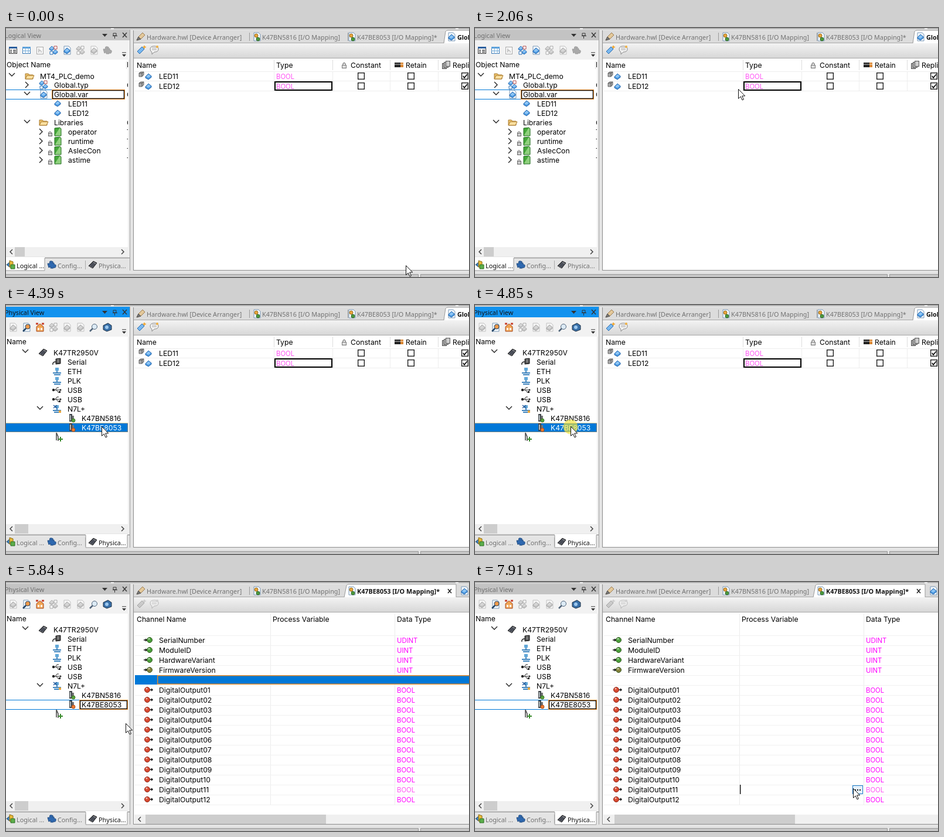
Animation, 790 px wide and 425 px high, one loop 8 s. Source, as an HTML page:

```html
<!DOCTYPE html>
<html lang="en">
<head>
<meta charset="utf-8">
<title>I/O mapping walkthrough</title>
<style>
html, body { margin: 0; width: 100%; height: 100%; overflow: hidden; background: #e4e4e4; }
svg { display: block; }
text { font: 12.2px Inter, "Open Sans", sans-serif; white-space: pre; }
.ui { font: 10.8px "Noto Sans", "Open Sans", sans-serif; fill: #707070; }
.on { fill: #111; }
.b { font-weight: 700; }
.type { font-size: 11.3px; fill: #f0f; }
.soft { fill: #ff50f4; }
.picked text { fill: #fff; }
.off { filter: grayscale(1); opacity: .5; }
</style>
</head>
<body>
<svg id="stage" width="790" height="425"></svg>
<script>
const KIND_IN = 'K47BN5816', KIND_OUT = 'K47BE8053', CPU = 'K47TR2950V', BUS = 'N7L+';
const BLUE = '#0078d7', ORANGE = '#e58a2b';

// Drawing helpers; y of text is the middle of its row.
const text = (x, y, s, cls = '') => `<text x="${x}" y="${y + 5}" class="${cls}">${s}</text>`;
const ui = (x, y, s, cls = '') => text(x, y - .4, s, 'ui ' + cls);
const rect = (x, y, w, h, fill) => `<rect x="${x}" y="${y}" width="${w}" height="${h}" fill="${fill}"/>`;
const box = (x, y, w, h, stroke, fill = 'none', sw = 1, more = '') =>
  `<rect x="${x + sw / 2}" y="${y + sw / 2}" width="${w - sw}" height="${h - sw}" fill="${fill}" stroke="${stroke}" stroke-width="${sw}" ${more}/>`;
const path = (d, stroke, fill = 'none', sw = 1, more = '') =>
  `<path d="${d}" stroke="${stroke}" fill="${fill}" stroke-width="${sw}" ${more}/>`;
const ball = (x, y, r, fill, stroke = 'none') => `<circle cx="${x}" cy="${y}" r="${r}" fill="${fill}" stroke="${stroke}"/>`;
const group = (id, ...parts) => `<g id="${id}">${parts.join('')}</g>`;
const range = (n, f) => Array.from({ length: n }, (_, i) => f(i)).join('');
const DOTS = 'stroke-dasharray="1 1"';

const gem = (x, y, s = 1) => `<g transform="translate(${x} ${y}) scale(${s})" stroke-linejoin="round">` +
  path('M-5 0L0-5 5-1V1L0 5-5 2Z', '#2767ad', '#4a98e0') + path('M-4 0L0-4 4-1 0 2Z', 'none', '#8cc4f4') + '</g>';
const sheet = path('M-5-7H3L6-4V7H-5Z', '#7896b4', '#f4faff');
const plug = path('M0-6V2M-7 3H7M-5 6H6', '#3d83bd', 'none', 2) + rect(-3, -6, 6, 5, '#62a8d8');
const lens = ball(1, -1, 4.5, '#dceaf5', '#51657a') + path('M-2 2L-7 7', '#51657a', 'none', 2.5);
const chip = path('M-7 2L1-6 7-3 0 6Z', '#222', '#4a4e58') + path('M-6 4L-4 2M-3 6L-1 4M1-4L5-2', '#aaa');
const module = rect(-4, -7, 5, 13, '#3f4448') + rect(-3, -5, 2, 9, '#aeb6ba') + rect(1, -4, 3, 10, '#777');
const art = {
  gem: gem(0, 0),
  folder: path('M-7-4H-2L0-2H6V5H-7Z', '#a8782a', '#edc36c') + path('M-7 5L-4-1H8L5 5Z', '#a8782a', '#fbe0a0'),
  types: gem(-3, -3, .8) + gem(3, 3, .8) + path('M1-7H6V-2H1Z', '#b34a4a', '#fff') + path('M-6 2H-1V7H-6Z', '#2b6cb0', '#fff'),
  page: sheet + gem(0, 1),
  list: box(-7, -6, 14, 12, '#333', '#fff') + rect(-7, -6, 14, 3, '#2b5f9e') + path('M-5 0H-2M0 0H5M-5 3H-2M0 3H5', '#333', 'none', 1.5),
  grid: box(-7, -6, 14, 12, '#3d7ab5', '#fff') + rect(-7, -6, 14, 3, '#5aa0dc') + path('M-2-6V6M3-6V6M-7 1H7', '#6fa8d6'),
  letter: box(-6, -6, 12, 13, '#aaa', '#f8f8f8') + path('M-2-3V4M-2 1Q2-2 2 4', '#999'),
  lock: path('M-2 0V-2Q0-5 2-2V0', '#666') + box(-3, -1, 7, 6, '#666', '#ccc'),
  book: path('M-5-6L4-7V6L-5 7Z', '#1e6b1e', '#45a83a') + path('M4-7L6-5V7L-5 7', '#1e6b1e', '#8fd07d'),
  bigLock: path('M-2 0V-3Q0-6 2-3V0', '#777', 'none', 1.3) + box(-4, -1, 8, 6, '#777', '#ddd'),
  battery: rect(-8, -4, 10, 8, '#222') + rect(2, -4, 5, 8, '#d98632') + rect(-8, -2, 15, 2, '#ffffff66'),
  stack: box(-7, -3, 8, 10, '#555', '#aaa') + box(-4, -5, 8, 10, '#555', '#bbb') + box(-1, -7, 8, 10, '#555', '#ccc'),
  tiny: path('M-4-2L-1-4H4V1L1 4H-4Z', '#666', '#aaa') + path('M-4-2H1V4M1-2L4-4', '#555'),
  pencil: path('M-7 6L-4 0 3-7 7-3 0 4Z', '#9a7a50', '#e3c89a') + path('M-7 6L-4 0 0 4Z', '#555', '#777'),
  map: sheet + ball(-1, -2, 3, '#e8a63c', '#9c6a18') + ball(2, 4, 3, '#4d9b3f', '#2c6425'),
  wand: path('M-7 2L1-6 5-2-3 6Z', '#2b6cb0', '#79b8ef') + path('M5-8V-3M2.5-5.5H8', '#f0a020', 'none', 1.6),
  note: path('M-7-2Q-7-7 0-7T7-2Q7 3 0 3L-4 7V3Q-7 2-7-2Z', '#888', '#f4f4f4') + path('M-4-4H4M-4-1H4', '#999') + ball(5, -6, 2, '#f0b040'),
  find: sheet + ball(2, -1, 4, '#ef9a4a', '#246') + path('M-1 2L-6 7', '#246', 'none', 2.5),
  house: path('M-6-1L0-6 6-1V7H-6Z', '#a64b25', '#f0a352') + path('M-7-6H-3M3-6H7', '#c8402c', 'none', 3) + rect(-4, 1, 3, 4, '#fff') + rect(1, 1, 3, 4, '#fff'),
  lens, chip, plug,
  pc: path('M-7-3L1-7 7-3V4L-1 7-7 4Z', '#234', '#386fa8') + ball(-1, 0, 3, '#9cc8ee'),
  serial: path('M-7 5Q-8 0-2 0', '#222', 'none', 1.5) + path('M-2-5L6-6V3L-2 4Z', '#222', '#444') + path('M0-3H4M0 0H4', '#ddd'),
  usb: path('M-7 0H6M-3 0L0-4H3M-1 0L2 4H4', '#222') + ball(-6, 0, 2.2, '#222') + rect(3, 2, 3, 3, '#222') + path('M5-2L8 0 5 2Z', 'none', '#222'),
  bus: plug + path('M-6-6L0-1M0-6L-6-1', '#245a9c', 'none', 1.6) + rect(3, 3, 4, 4, '#e8a63c'),
  modIn: module + ball(3, 4, 3, '#58a23d', '#3a7525'),
  modOut: module + ball(3, 4, 3, '#ee7a2e', '#ad4818'),
  add: path('M-3-7L0 0V7M-3-7V6', '#555', 'none', 1.7) + path('M4 0V8M0 4H8', '#3c8d2f', 'none', 2),
  cubes: path('M-7 0L-2-4 2-1-2 4Z', '#245', '#3f86cc') + path('M-2-7L4-5V5L-2 4Z', '#8c6a10', '#e8b93a') + path('M0 0H7V7H0Z', '#2c6e25', '#5cae4b'),
  puzzle: path('M-7-2H-3Q-5-7 0-6T0-3H4V0Q8-1 7 3T3 4V6H-2V3L-5 5Z', '#1f4a80', '#2f69b0'),
};
const icon = (name, x, y, cls = '') => `<g transform="translate(${x} ${y})" class="${cls}">${art[name]}</g>`;
const open = (x, y) => path(`M${x - 5} ${y - 3}l5 5 5-5`, '#222', 'none', 1.4);
const shut = (x, y) => path(`M${x - 2} ${y - 5}l5 5-5 5`, '#222', 'none', 1.4);
const check = (x, y, on) => box(x - 6, y - 6, 12, 12, '#111', '#fff', 1.3) + (on ? path(`M${x - 3} ${y}l2 3 5-6`, '#111', 'none', 1.8) : '');
const tools = names => names.split(' ').map((n, i) => icon(n.replace('-', ''), 12 + i * 23, 38, n[0] == '-' ? 'off' : '')).join('');
const scroll = (x, y, w, from, len) => rect(x, y, w, 16, '#f0f0f0') + rect(from, y, len, 16, '#cdcdcd') +
  path(`M${x + 11} ${y + 4}l-4 4 4 4`, '#444', 'none', 1.5);
const treeScroll = len => scroll(0, 374, 208, 15, len) + path('M197 378l4 4-4 4', '#444', 'none', 1.5);
const focusRow = (y, x, end) => path(`M0 ${y - 7.5}H${x}M0 ${y + 8.5}H${x}`, BLUE) +
  box(x - 1, y - 8, end - x + 2, 17, ORANGE) + box(x, y - 7, end - x, 15, '#111', '#fff', 1.3);

const titleBar = (id, fill) => group(id, rect(0, 3, 211, 18, fill),
  path('M164 10h9l-4.5 5z', 'none', '#333'), path('M183 9h5v4h-5zM182 13.5h8M185.5 14v4', '#333'), path('M199 8l7 8M206 8l-7 8', '#333', 'none', 1.4));

const frame = '<linearGradient id="bar" x2="0" y2="1"><stop stop-color="#f4f4f4"/><stop offset="1" stop-color="#d6d6d6"/></linearGradient>' +
  rect(0, 0, 790, 425, '#e4e4e4') + rect(0, 0, 179, 2, '#b4b4b4') + rect(184, 0, 583, 2, '#b4b4b4') + rect(772, 0, 18, 2, '#b4b4b4') +
  rect(0, 21, 211, 33, '#f2f2f2') + rect(0, 54, 208, 320, '#fff') + rect(211, 3, 1, 411, '#a0a0a0') + rect(208, 54, 3, 337, '#eee') +
  rect(0, 392, 211, 1, '#888') + path('M135.5 397V412', '#aaa') +
  path('M198 42h7', '#333') + path('M198 45h7l-3.5 4z', 'none', '#333') +
  rect(0, 420, 703, 5, '#c6c6c6') + rect(707, 420, 83, 5, '#c6c6c6') + path('M0 420.5H703.5V425M707.5 425V420.5H790', '#999') +
  rect(217, 4, 573, 22, '#dcdcdc') + rect(217, 25, 573, 27, 'url(#bar)') + rect(217, 51, 573, 363, '#fff') +
  path('M217.5 4V414M217 413.5H790', '#8d8d8d') + path('M218 25.5H790M218 51.5H790', '#a8a8a8');

const bottomTab = (x, w) => path(`M${x} 392H${x + w}V414H${x}Z`, '#999', '#fff') + rect(x, 391, w, 2, '#fff');
const bottomTabs = active => ['Logical ...', 'Config...', 'Physica...'].map((s, i) =>
  icon(['cubes', 'puzzle', 'chip'][i], 8 + i * 70, 404) + ui(18 + i * 70, 405, s, i == active ? 'on' : '')).join('');

const logical = group('logical',
  tools('list grid letter types page -types -page -puzzle'),
  text(1, 62, 'Object Name'), path('M205.5 57V70', '#ddd'),
  open(10, 80), icon('folder', 40, 82), text(58, 82, 'MT4_PLC_demo'),
  shut(35, 97), icon('types', 64, 97), text(82, 97, 'Global.typ'),
  focusRow(113, 79, 202), open(36, 112), icon('page', 64, 113), text(82, 113, 'Global.var'),
  icon('gem', 88, 129), text(106, 129, 'LED11'), icon('gem', 88, 145), text(106, 145, 'LED12'),
  open(36, 160), icon('folder', 64, 161), text(82, 161, 'Libraries'),
  ...['operator', 'runtime', 'AsIecCon', 'astime'].map((s, i) => {
    const y = 177 + i * 16;
    return shut(59, y) + icon('lock', 75, y + 3) + icon('book', 88, y) + text(106, y, s);
  }),
  // Next column, cut off by the pane edge.
  '<svg width="208" height="374">', text(206, 62, 'D'), ...[97, 113, 161].map(y => text(206, y, 'C')),
  range(4, i => text(206, 177 + i * 16, 'T')), '</svg>',
  treeScroll(17), bottomTab(-1, 67), bottomTabs(0));

const devices = [['chip', 63, CPU], ['serial', 87, 'Serial'], ['plug', 87, 'ETH'], ['plug', 87, 'PLK'], ['usb', 87, 'USB'],
  ['usb', 87, 'USB'], ['bus', 87, BUS], ['modIn', 112, KIND_IN], ['modOut', 112, KIND_OUT], ['add', 89, '']];
const physical = group('physical',
  tools('-page find house -types -page -page lens pc'),
  text(1, 62, 'Name'),
  group('rowLine', box(-1, 201, 209, 16, BLUE)),
  group('rowFill', rect(0, 202, 208, 15, BLUE), box(-1, 201, 209, 16, ORANGE, 'none', 1, DOTS)),
  group('rowEdit', focusRow(209, 126, 207)),
  open(33, 79), open(58, 176),
  ...devices.map(([n, x, s], i) => {
    const label = text(x + 18 - (n.startsWith('mod') ? 1 : 0), 81 + i * 16, s);
    return icon(n, x, 81 + i * 16) + (i == 8 ? group('rowText', label) : label);
  }),
  treeScroll(23), bottomTab(136, 71), bottomTabs(2));

const tabOut = KIND_OUT + ' [I/O Mapping]*';
const docs = icon('pencil', 230, 15) + ui(240, 15, 'Hardware.hwl [Device Arranger]') + path('M415.5 8V22', '#999') +
  icon('map', 428, 15) + ui(437, 15, KIND_IN + ' [I/O Mapping]');

const variables = group('variables',
  path('M583.5 8V22', '#999'), icon('map', 590, 15), ui(599, 15, tabOut),
  path('M747 26L750 6Q751 4 754 4H791V26', '#999', '#fff'), icon('page', 760, 15), ui(770, 15, 'Global.var', 'on b'),
  icon('wand', 231, 38), icon('note', 253, 38),
  text(223, 63, 'Name'), text(461, 63, 'Type'), icon('bigLock', 577, 64), text(588, 63, 'Constant'),
  icon('battery', 671, 63), text(682, 63, 'Retain'), icon('stack', 751, 63), text(762, 63, 'Replicable'),
  path('M457.5 54V72M557.5 54V72M655.5 54V72M737.5 54V72', '#ddd'),
  path('M220 74.5H790M220 90.5H790M220 107.5H790M457.5 74V107M557.5 74V107M655.5 74V107M737.5 74V107', '#eee'),
  ...['LED11', 'LED12'].map((s, i) => {
    const y = 82 + i * 17;
    return icon('tiny', 231, y - 3) + icon('gem', 243, y + 1) + text(261, y, s) + text(461, y, 'BOOL', 'type soft') +
      check(606, y, 0) + check(691, y, 0) + check(783, y, 1);
  }),
  group('cellBox', box(458, 91, 99, 16, '#000', 'none', 2)),
  group('dotted', box(458, 92, 99, 14, '#000', 'none', 1), path('M219 91.5H790M219 106.5H790', '#333', 'none', 1, DOTS)));

const channels = ['SerialNumber', 'ModuleID', 'HardwareVariant', 'FirmwareVersion', '',
  ...Array.from({ length: 12 }, (_, i) => 'DigitalOutput' + String(i + 1).padStart(2, '0'))];
const port = (y, i) => i < 4
  ? path(`M235 ${y}h5M238 ${y - 2}l2 2-2 2`, '#111', 'none', 1.4) + ball(245, y, 4.5, i == 3 ? '#85823c' : '#4ba03c', '#31551f') + ball(244, y - 2, 1.5, '#ffffff99')
  : path(`M244 ${y}h6M248 ${y - 2}l2 2-2 2`, '#111', 'none', 1.4) + ball(241, y, 4.5, '#d84a30', '#8d2418') + ball(240, y - 2, 1.5, '#ffffff99');
const selected = (y, x, w) => rect(220, y - 8, 570, 16, BLUE) + box(x, y - 8, w, 16, ORANGE, 'none', 1.5);
const mapping = group('mapping',
  path('M577 26L581 6Q582 4 584 4H768V26', '#999', '#fff'), icon('map', 590, 15), ui(599, 15, tabOut, 'on b'),
  path('M754 12l6 7M760 12l-6 7', '#222', 'none', 1.5), icon('page', 782, 15),
  icon('wand', 231, 38, 'off'), icon('note', 253, 38, 'off'),
  text(223, 63, 'Channel Name'), text(455, 63, 'Process Variable'), text(667, 63, 'Data Type'),
  path('M451.5 54V380M663.5 54V380', '#ebebeb'),
  range(18, i => path(`M220 ${91.5 + i * 17}H790`, '#f1f1f1')),
  group('pickBlank', selected(167, 258, 534)),
  group('pickLast', selected(354, 452, 211)),
  channels.map((s, i) => {
    const y = 99 + i * 17;
    if (!s) return '';
    const kind = i == 0 ? 'UDINT' : i < 4 ? 'UINT' : 'BOOL';
    const row = text(261, y, s) + text(667, y, kind, 'type' + (i == 15 ? ' soft' : ''));
    return port(y, i) + (i == 15 ? group('lastText', row) : row);
  }).join(''),
  group('more', box(644, 347, 18, 15, '#1979c8', '#e5f1fb'), range(3, i => rect(648 + i * 4, 354, 2, 2, '#111'))),
  group('caret', rect(452, 346, 1.3, 16, '#000')),
  scroll(219, 397, 571, 238, 308));

const stage = document.getElementById('stage');
stage.innerHTML = frame + titleBar('titleGrey', '#c3c3c3') + titleBar('titleBlue', '#1292ee') +
  group('nameLogical', ui(-2, 12, 'Logical View')) + group('namePhysical', ui(-2, 12, 'Physical View')) +
  group('nameActive', ui(-2, 12, 'Physical View', 'on')) +
  logical + physical + docs + variables + mapping +
  group('tip', box(174, 420, 72, 18, '#767676', '#fff')) +
  `<circle id="halo" r="12.5" fill="#f4e53c"/>` +
  group('cursor', path('M.5.5V16.5L4.2 13 7 19 9.4 18 6.7 12H11.7Z', '#111', '#fff'));

const el = id => document.getElementById(id);
const show = (id, on) => el(id).style.display = on ? '' : 'none';

// Pointer keys: time, x, y.
const keys = [[0, 682, 405], [20, 682, 405], [270, 535, 300], [560, 320, 208], [830, 178, 316], [910, 202, 299], [1200, 375, 165],
  [1470, 497, 66], [1660, 480, 95], [2060, 449, 104], [2250, 300, 250], [2470, 152, 412], [2700, 152, 412], [2980, 174, 400],
  [3870, 174, 400], [4390, 163, 207], [5460, 163, 207], [5840, 204, 241], [6270, 542, 339], [6490, 567, 356],
  [6870, 567, 356], [7280, 645, 352], [8000, 645, 352]];
const slope = (i, k) => (keys[i + 1][k] - keys[i][k]) / (keys[i + 1][0] - keys[i][0]);
function tangent(i, k) {
  if (i == 0 || i == keys.length - 1) return 0;
  const a = slope(i - 1, k), b = slope(i, k);
  return a * b <= 0 ? 0 : 2 * a * b / (a + b);
}
function pointer(t, k) {
  const i = Math.max(0, keys.findIndex(p => p[0] > t) - 1);
  const [p, q] = [keys[i], keys[i + 1]], d = q[0] - p[0], u = (t - p[0]) / d, v = 1 - u;
  return v * v * (1 + 2 * u) * p[k] + u * u * (3 - 2 * u) * q[k] + d * u * v * (v * tangent(i, k) - u * tangent(i + 1, k));
}

const clicks = [[3390, 3490], [4600, 4700], [4800, 4920], [6720, 6830], [7460, 7570]];

function draw(t) {
  const views = t >= 3450, named = t >= 3680, active = t >= 3720 && t < 5200, mapped = t >= 5200;
  const dotted = views && t < 3720, pickLast = t >= 6800 && t < 7540;
  show('logical', !views); show('physical', views);
  show('nameLogical', !named); show('namePhysical', named && !active); show('nameActive', active);
  show('titleBlue', active); show('titleGrey', !active);
  show('rowLine', !active && !mapped); show('rowFill', active); show('rowEdit', mapped);
  el('rowText').classList.toggle('picked', active);
  show('variables', !mapped); show('mapping', mapped);
  show('dotted', dotted); show('cellBox', !dotted);
  show('pickBlank', t < 6800); show('pickLast', pickLast);
  el('lastText').classList.toggle('picked', pickLast);
  show('more', t >= 6800); show('caret', t >= 7540);
  show('tip', t >= 3160 && t < 3390);
  const x = pointer(t, 1), y = pointer(t, 2);
  el('cursor').setAttribute('transform', `translate(${Math.round(x)} ${Math.round(y)})`);
  const click = clicks.find(([a, b]) => t >= a && t < b);
  show('halo', click);
  if (click) {
    const u = (t - click[0]) / (click[1] - click[0]);
    el('halo').setAttribute('transform', `translate(${x} ${y + 1})`);
    el('halo').setAttribute('opacity', .8 * (1 - u * u));
  }
}
function tick() {
  draw(performance.now() % 8000);
  requestAnimationFrame(tick);
}
tick();
</script>
</body>
</html>
```
